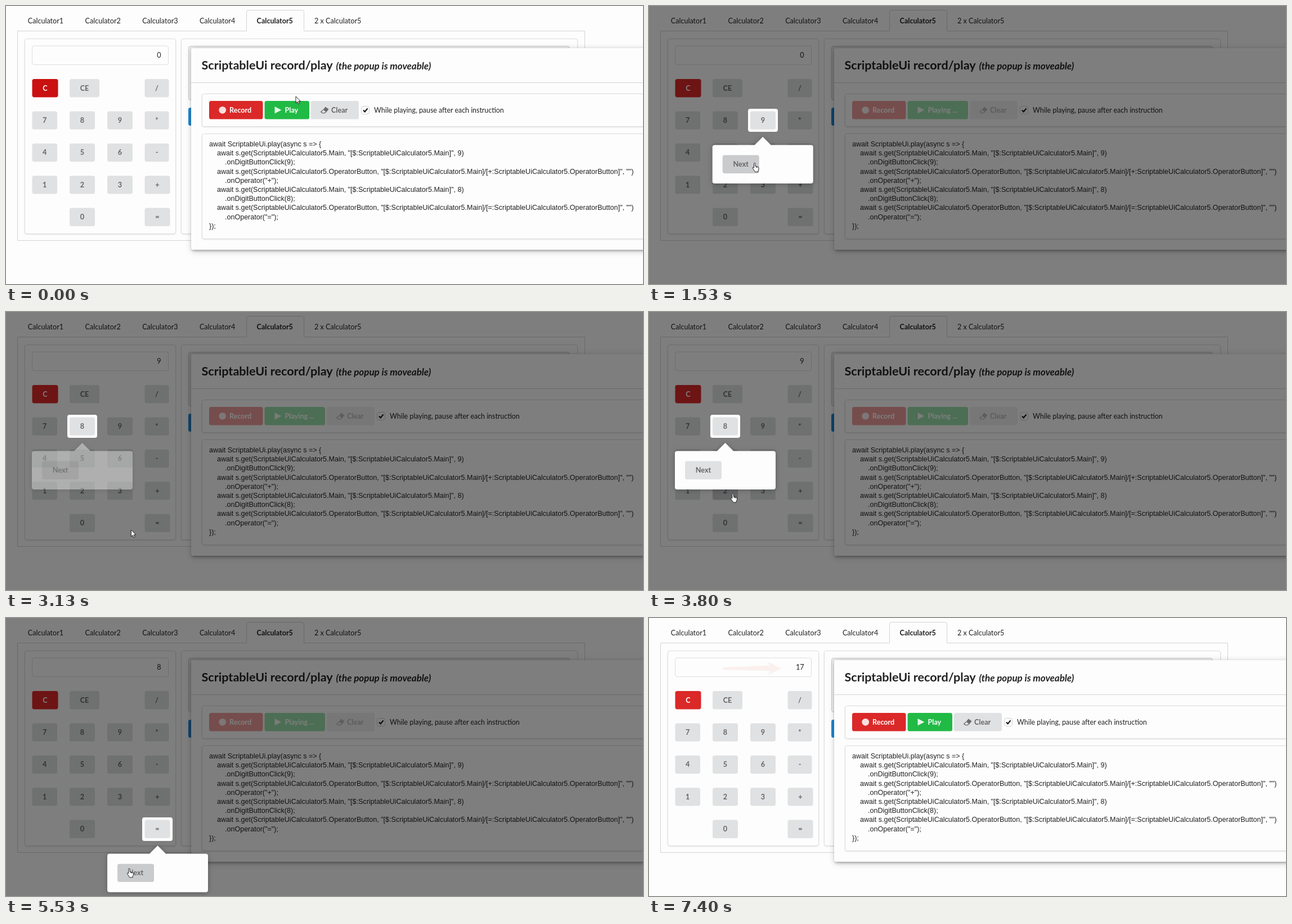
An HTML page that plays this animation: 1132x495 px, repeating every 7460 ms.

```html
<!DOCTYPE html>
<html lang="en">
<head>
<meta charset="utf-8">
<style>
  html, body { margin: 0; height: 100%; overflow: hidden; background: #fdfdfd; }
  svg { display: block; width: 100vw; height: 100vh; }
  text { font: 12.6px Lato, sans-serif; fill: #222; white-space: pre; }
  .bold { font-weight: 700; }
  .mid { text-anchor: middle; }
  .end { text-anchor: end; }
  .label { font-weight: 700; fill: #646566; }
  .light { font-weight: 700; fill: #fff; }
  .option { font-size: 12.4px; }
  .title { font-size: 21.6px; font-weight: 700; }
  .note { font-size: 17px; font-weight: 700; font-style: italic; }
  .code { font: 12.54px "Liberation Sans", Arial, sans-serif; }
  .line { fill: none; stroke: #d4d4d5; }
  .card { fill: #fdfdfd; stroke: #dededf; filter: drop-shadow(0 1px 1px #2224261f); }
  .modal { fill: #fdfdfd; filter: drop-shadow(1px 2px 2px #0004) drop-shadow(1px 2px 6px #0003); }
  .tip { fill: #fdfdfd; filter: drop-shadow(0 1px 4px #0004); }
</style>
</head>
<body>
<svg id="stage" viewBox="0 0 1132 495" preserveAspectRatio="none"></svg>
<script>
const LOOP = 7460, GREY = '#e0e1e2', GREY_HOVER = '#cacbcd';
const stage = document.getElementById('stage');

function set(node, attrs) {
  for (const k in attrs) node.setAttribute(k, attrs[k]);
  return node;
}
function el(tag, attrs = {}, parent = stage) {
  return parent.appendChild(set(document.createElementNS('http://www.w3.org/2000/svg', tag), attrs));
}
const group = parent => el('g', {}, parent);
const rect = (x, y, width, height, attrs, parent) =>
  el('rect', { x, y, width, height, rx: 3.6, ...attrs }, parent);
const path = (d, attrs, parent) => el('path', { d, ...attrs }, parent);
function text(x, y, s, cls = '', parent) {
  const node = el('text', { x, y, class: cls }, parent);
  node.textContent = s;
  return node;
}
const roundBox = (x, y, w, h, r = 4) =>
  `M${x + r} ${y}h${w - 2 * r}q${r} 0 ${r} ${r}v${h - 2 * r}q0 ${r} ${-r} ${r}` +
  `h${2 * r - w}q${-r} 0 ${-r} ${-r}v${2 * r - h}q0 ${-r} ${r} ${-r}z`;

// Tabs and panels
path('M427.5 44.5H20.5V417.5H1028.5V44.5H530M427.5 44.5V11q0-3.5 3.5-3.5H526q3.5 0 3.5 3.5V44.5', { class: 'line' });
for (let i = 1; i < 6; i++) text(38.8 + (i - 1) * 101.7, 31, 'Calculator' + i, i == 5 ? 'bold' : '');
text(548, 31, '2 x Calculator5');
rect(33.5, 58.5, 268, 347, { class: 'card' });
rect(311.5, 58.5, 704, 347, { class: 'card' });
rect(46.5, 71, 242, 33.5, { fill: '#fdfdfd', stroke: '#dededf' });
const display = text(275.5, 92, '0', 'end');
rect(324.5, 71.5, 677, 96, { fill: '#ececec', stroke: '#c8c9ca' });
rect(324, 181, 60, 32, { fill: '#2185d0' });

// Calculator keys
const rowY = i => 130 + i * 57.4, colX = [46.5, 113, 180, 246.5];
const clearKey = rect(46.5, 130, 46, 32.4);
text(69.5, 150.6, 'C', 'light mid');
const keys = [];
['|CE||/', '7|8|9|*', '4|5|6|-', '1|2|3|+', '|0||='].forEach((row, r) =>
  row.split('|').forEach((s, c) => {
    if (!s) return;
    const w = s == 'CE' ? 53 : '+='.includes(s) ? 45 : c == 3 ? 43 : c == 0 ? 44.5 : 45;
    const k = { x: colX[c], y: rowY(r), w, h: 32.4 };
    k.node = rect(k.x, k.y, w, k.h, { fill: GREY });
    text(k.x + w / 2, k.y + 20.6, s, 'label mid');
    keys.push(k);
  }));

// Record/play popup
rect(329, 75, 830, 359, { class: 'modal' });
path('M329 136.5H1132', { class: 'line', stroke: '#e4e4e5' });
text(347.5, 112.5, 'ScriptableUi record/play', 'title');
text(586.5, 112.5, '(the popup is moveable)', 'note');
rect(348.5, 156.5, 820, 58, { class: 'card' });
rect(348.5, 227.5, 820, 187, { class: 'card' });

const actions = group(), clearBtn = group(actions), shifted = group();
rect(361, 169, 95.5, 32.5, { fill: '#db2828' }, actions);
el('circle', { cx: 384.7, cy: 185.3, r: 6.4, fill: '#fff', opacity: .85 }, actions);
text(397, 190, 'Record', 'light', actions);
const play = rect(459.5, 169, 79.5, 32.5, {}, actions);
path('M477.5 179l12 6.3-12 6.3z', { fill: '#fff', opacity: .88 }, actions);
const playText = text(495.5, 190, 'Play', 'light', actions);
rect(542, 169, 85, 32.5, { fill: GREY }, clearBtn);
path('M563.5 184.7l4.2-5.2 5.8 4.2-4.2 5.2z', { fill: '#6b6c6d' }, clearBtn);
path('M563.3 185.2l-3.6 3.2 2.6 2.2h3.8l2.8-1.8', { fill: 'none', stroke: '#6b6c6d', 'stroke-width': 1.3 }, clearBtn);
text(578, 190, 'Clear', 'label', clearBtn);
rect(631.5, 178.5, 14, 14, { fill: '#fff', stroke: '#cfcfd0' }, shifted);
path('M635 185.4l2.7 3 4.8-6', { fill: 'none', stroke: '#111', 'stroke-width': 2.2 }, shifted);
text(654, 190, 'While playing, pause after each instruction', 'option', shifted);

const calc = 'ScriptableUiCalculator5', main = `[$:${calc}.Main]`;
const digit = n => [`1await s.get(${calc}.Main, "${main}", ${n})`, `2.onDigitButtonClick(${n});`];
const oper = o => [
  `1await s.get(${calc}.OperatorButton, "${main}/[${o}:${calc}.OperatorButton]", "")`,
  `2.onOperator("${o}");`];
['0await ScriptableUi.play(async s => {', ...digit(9), ...oper('+'), ...digit(8), ...oper('='), '0});']
  .forEach((s, i) => text(361 + s[0] * 14, 250 + i * 16.2, s.slice(1), 'code'));

// Dimming layer with a hole, then the step bubble
const shade = path('', { 'fill-rule': 'evenodd', opacity: .5 });
const bubble = group();
path('M4 0H75L89.5-14.5 104 0H175q4 0 4 4V64.5q0 4-4 4H4q-4 0-4-4V4q0-4 4-4z', { class: 'tip' }, bubble);
const next = rect(18, 18, 65, 32.4, {}, bubble);
text(50.5, 38.6, 'Next', 'label mid', bubble);

const mark = path('M131 88L215 84.5Q213 80 209 77L236 90 209 102Q214 98 215 94L131 92z', { fill: '#e8603c' });
const outline = { fill: '#fff', stroke: '#111', 'stroke-width': .9, 'stroke-linejoin': 'round' };
const pointer = path('M0 0v12l2.8-2.6 1.9 4.2 1.9-.8-1.8-4.1h3.8z', outline);
const hand = path('M-1.2 9V1.2a1.2 1.2 0 0 1 2.4 0V6l1.7.3 1.7.4 1.5.5q1.3.4 1.2 2v2.5L6.1 14V16H.8l-2-3-2.3-3.6q-.5-1.4.6-1.6.8 0 1.7 1.2zM2.9 6.5v2M4.6 7v1.7', outline);

// Steps: start, spotlight, bubble place, shown value
const steps = [
  { at: 660, spot: [176, 183, 53, 41], tip: [112.7, 247.5], value: 0 },
  { at: 1800, spot: [242, 298, 54, 41], tip: [180, 362.5], value: 9 },
  { at: 3000, spot: [109, 183, 53, 41], tip: [46, 247.5], value: 9 },
  { at: 4460, spot: [242, 355, 54, 42], tip: [180, 419.7], value: 8 }];
const DONE = 5800;

// Pointer: time, x, y
const route = [
  [60, 515, 161], [330, 517, 177], [700, 517, 177], [1400, 245, 267], [1600, 166, 284],
  [2200, 166, 284], [2930, 228, 393], [3000, 228, 393], [3800, 149, 323], [4130, 97, 281],
  [4460, 97, 281], [5200, 230, 412], [5530, 219, 446]];

const clamp = v => Math.max(0, Math.min(1, v));
const inside = (x, y, b) => x >= b.x && x <= b.x + b.w && y >= b.y && y <= b.y + b.h;

function pointerAt(t) {
  const i = route.findIndex(p => p[0] > t);
  if (i < 1) return (i < 0 ? route[route.length - 1] : route[0]).slice(1);
  const [a, b] = [route[i - 1], route[i]];
  const u = (t - a[0]) / (b[0] - a[0]), e = u * u * (3 - 2 * u);
  return [a[1] + (b[1] - a[1]) * e, a[2] + (b[2] - a[2]) * e];
}

function draw(t) {
  const playing = t >= steps[0].at && t < DONE;
  const step = playing ? steps.filter(s => s.at <= t).pop() : null;
  const [x, y] = pointerAt(t), shift = playing ? 28 : 0;

  display.textContent = step ? step.value : t < DONE ? 0 : 17;

  let onNext = false, onTip = false;
  if (step) {
    const [bx, by] = step.tip;
    onTip = inside(x, y, { x: bx, y: by, w: 179, h: 68.5 });
    onNext = inside(x, y, { x: bx + 18, y: by + 18, w: 65, h: 32.4 });
    set(shade, { d: 'M0 0H1132V495H0z' + roundBox(...step.spot) });
    set(bubble, { transform: `translate(${bx} ${by})`, opacity: clamp((t - step.at - 30) / 260) });
    set(next, { fill: onNext ? GREY_HOVER : GREY });
  }
  shade.style.display = bubble.style.display = step ? '' : 'none';

  let onKey = false;
  for (const k of keys) {
    const hit = !onTip && inside(x, y, k);
    onKey = onKey || hit;
    set(k.node, { fill: hit ? GREY_HOVER : GREY });
  }
  const onPlay = t < steps[0].at && inside(x, y, { x: 459.5, y: 169, w: 79.5, h: 32.5 });

  const blur = clamp((t - 200) / 100);
  set(clearKey, { fill: `rgb(${202 + 17 * blur},${16 + 24 * blur},${16 + 24 * blur})` });
  set(actions, { opacity: t < DONE ? 1 - .55 * clamp((t - 660) / 120) : .45 + .55 * clamp((t - DONE) / 130) });
  for (const node of [clearBtn, shifted]) set(node, { transform: `translate(${shift})` });
  set(play, { width: 79.5 + shift, fill: onPlay ? '#16ab39' : '#21ba45' });
  playText.textContent = playing ? 'Playing ...' : 'Play';

  const useHand = onNext || onKey || onPlay, gone = t >= 6200;
  for (const [node, on] of [[hand, useHand], [pointer, !useHand]]) {
    set(node, { transform: `translate(${x} ${y})` });
    node.style.display = on && !gone ? '' : 'none';
  }
  set(mark, { opacity: gone ? clamp(.5 + (t - 6200) / 120) * clamp(1 - (t - 6860) / 590) : 0 });
}

function tick() {
  draw(performance.now() % LOOP);
  requestAnimationFrame(tick);
}
tick();
</script>
</body>
</html>
```
